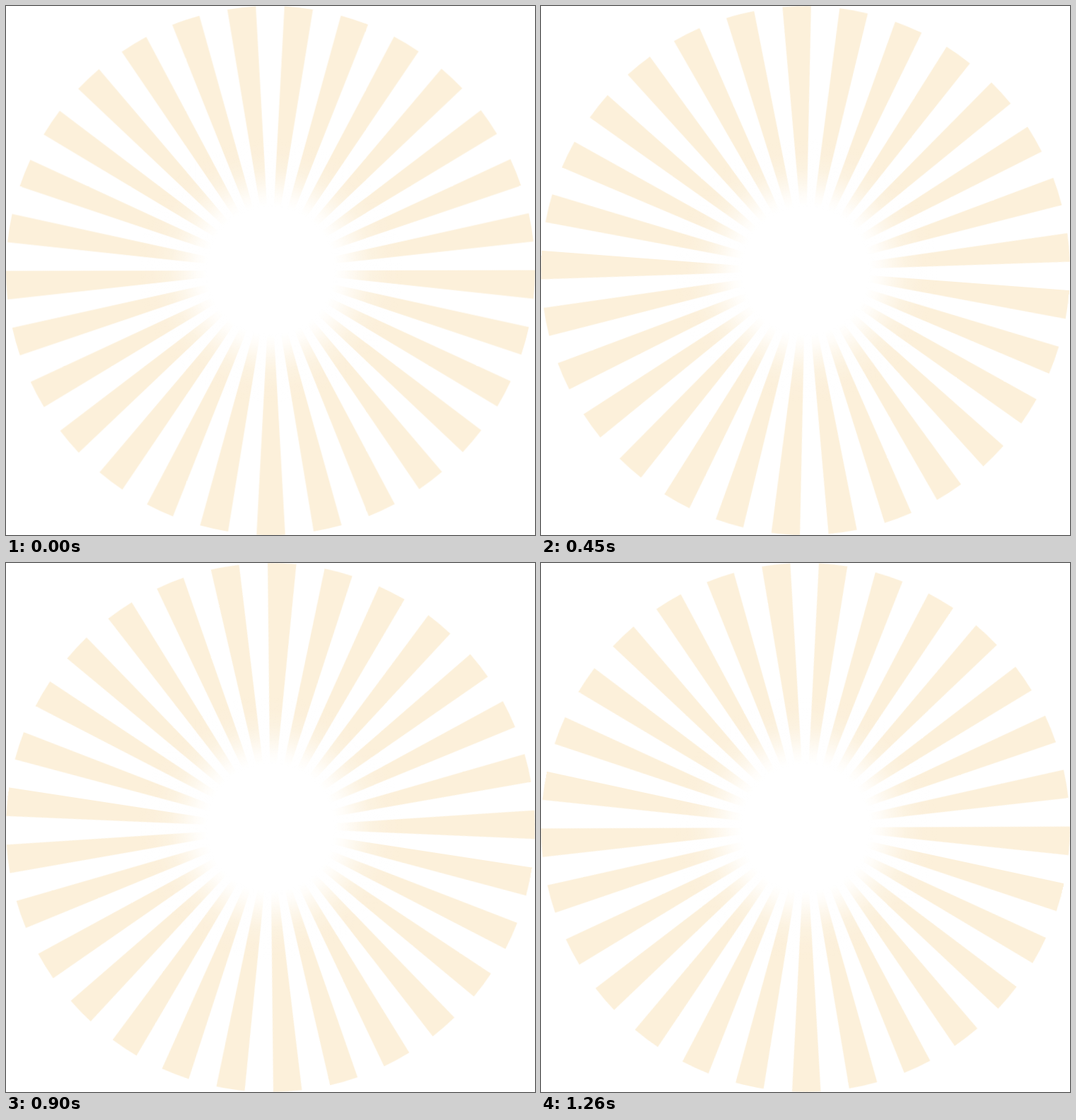
An HTML page that plays this animation: 748x748 px, repeating every 1.29 s.

```html
<!DOCTYPE html>
<html lang="en">
<head>
<meta charset="utf-8">
<title>Turning sunburst</title>
<style>
  html, body {
    margin: 0;
    width: 100%;
    height: 100%;
    overflow: hidden;
    background: #fff;
  }
  svg { display: block; width: 748px; height: 748px; }
  #rays {
    fill: #fcf0da;
    transform-origin: 0 0;
    animation: turn 1290ms steps(43, end) infinite;
  }
  /* slightly more than one ray spacing, so the last step lands next to the first */
  @keyframes turn {
    from { transform: rotate(-0.08deg); }
    to { transform: rotate(12.51deg); }
  }
</style>
</head>
<body>
<svg viewBox="-374 -374 748 748">
  <defs>
    <radialGradient id="glow" gradientUnits="userSpaceOnUse" cx="0" cy="0" r="187">
      <stop offset="0.48" stop-color="#fff"/>
      <stop offset="0.56" stop-color="#fff" stop-opacity="0.82"/>
      <stop offset="0.66" stop-color="#fff" stop-opacity="0.48"/>
      <stop offset="0.76" stop-color="#fff" stop-opacity="0.2"/>
      <stop offset="0.87" stop-color="#fff" stop-opacity="0.06"/>
      <stop offset="1" stop-color="#fff" stop-opacity="0"/>
    </radialGradient>
  </defs>
  <path id="rays"/>
  <circle r="187" fill="url(#glow)"/>
</svg>
<script>
  const COUNT = 29, RADIUS = 374;
  const step = 2 * Math.PI / COUNT;
  const rim = a => `${RADIUS * Math.cos(a)} ${RADIUS * Math.sin(a)}`;
  const ray = (_, i) =>
    `M0 0L${rim(i * step)}A${RADIUS} ${RADIUS} 0 0 1 ${rim((i + 0.5) * step)}Z`;
  document.getElementById('rays')
    .setAttribute('d', Array.from({ length: COUNT }, ray).join(''));
</script>
</body>
</html>
```
